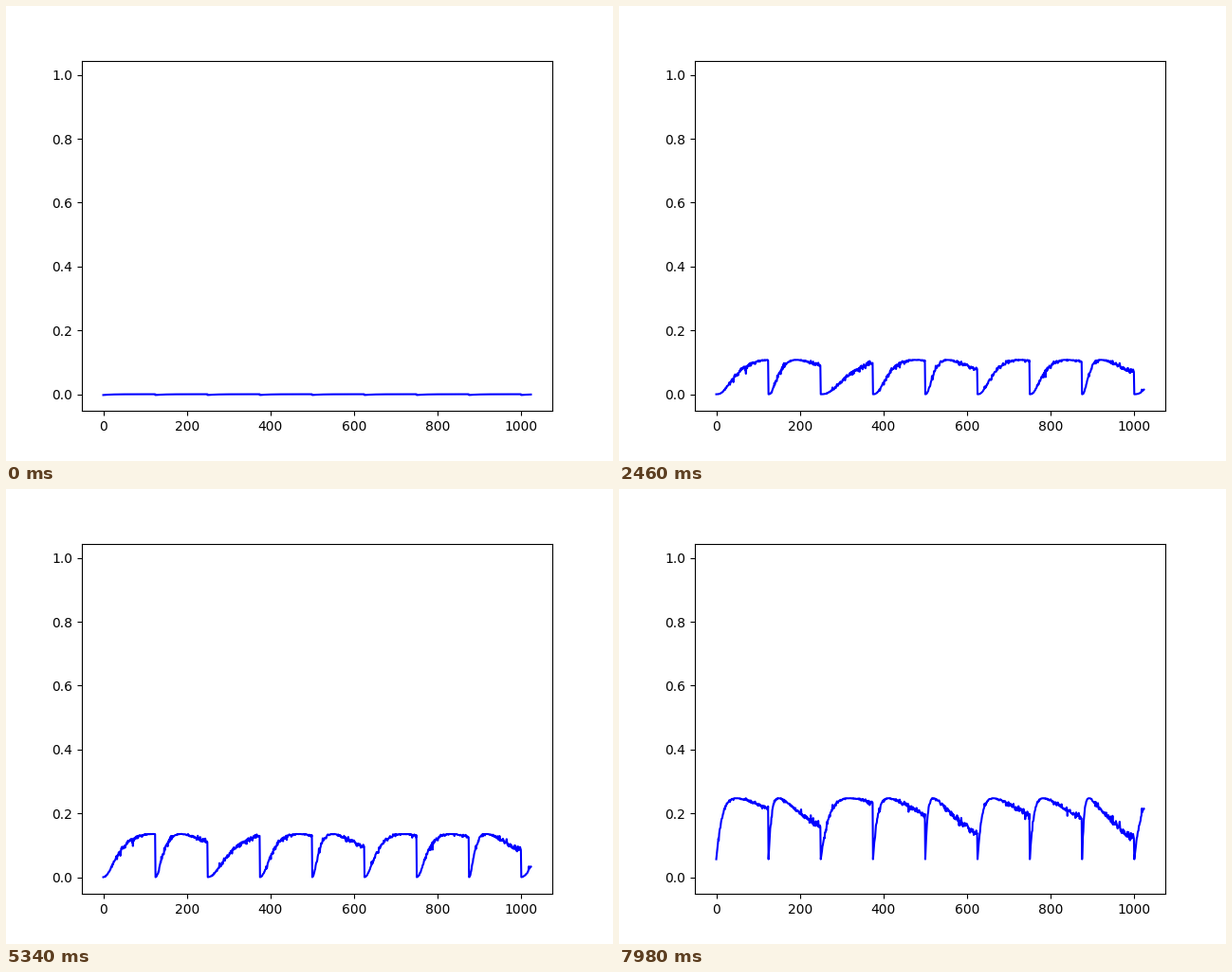
Animation of 640 by 480 pixels, one loop 8000 ms. Source, as a matplotlib script:

```python
import numpy as np
import matplotlib.pyplot as plt
from matplotlib.animation import FuncAnimation

POINTS = 1024      # samples along the x axis
RUN = 125          # samples per diffusion run
SLICES = 50        # positions scanned across the box, then repeated
STEP = 0.285       # distance between slices, in initial pulse widths
HALF = STEP * (SLICES - 1) / 2
PEAK = 0.988
TICK = 20          # ms
HOLD = 3           # ticks per slice
LOOP = 8000        # ms

# growth of the pulse variance per sample in each run
RATES = np.array([0.10, 0.20, 0.07, 0.13, 0.25, 0.13, 0.15, 0.29, 0.085])

x = np.arange(POINTS)
run, age = x // RUN, x % RUN


def pulse_variance():
    rng = np.random.default_rng(7)
    noise = np.clip(0.05 * rng.standard_t(4, POINTS), -0.4, 0.3)
    return 1.03 + RATES[run] * age * (1 + noise)


variance = pulse_variance()


def profile(k):
    """Diffusing pulse at slice k between two absorbing walls."""
    d = STEP * k - HALF
    total = np.zeros(POINTS)
    for n in range(-3, 4):
        total += (-1) ** n * np.exp(-(d + 2 * n * HALF) ** 2 / (2 * variance))
    wall_dip = 0.0025 * np.exp(-age / 20) * (d / HALF) ** 8
    return PEAK * total / np.sqrt(variance) - wall_dip


curves = [profile(k) for k in range(SLICES)]

fig, ax = plt.subplots(figsize=(6.4, 4.8), dpi=100)
line, = ax.plot(x, curves[0], color="blue", lw=1.5)
ax.set_xlim(-51.15, 1074.15)
ax.set_ylim(-0.0524, 1.0448)


def update(i):
    line.set_ydata(curves[i // HOLD % SLICES])
    return line,


anim = FuncAnimation(fig, update, frames=LOOP // TICK, interval=TICK,
                     repeat=True, repeat_delay=0, blit=True)
plt.show()
```
